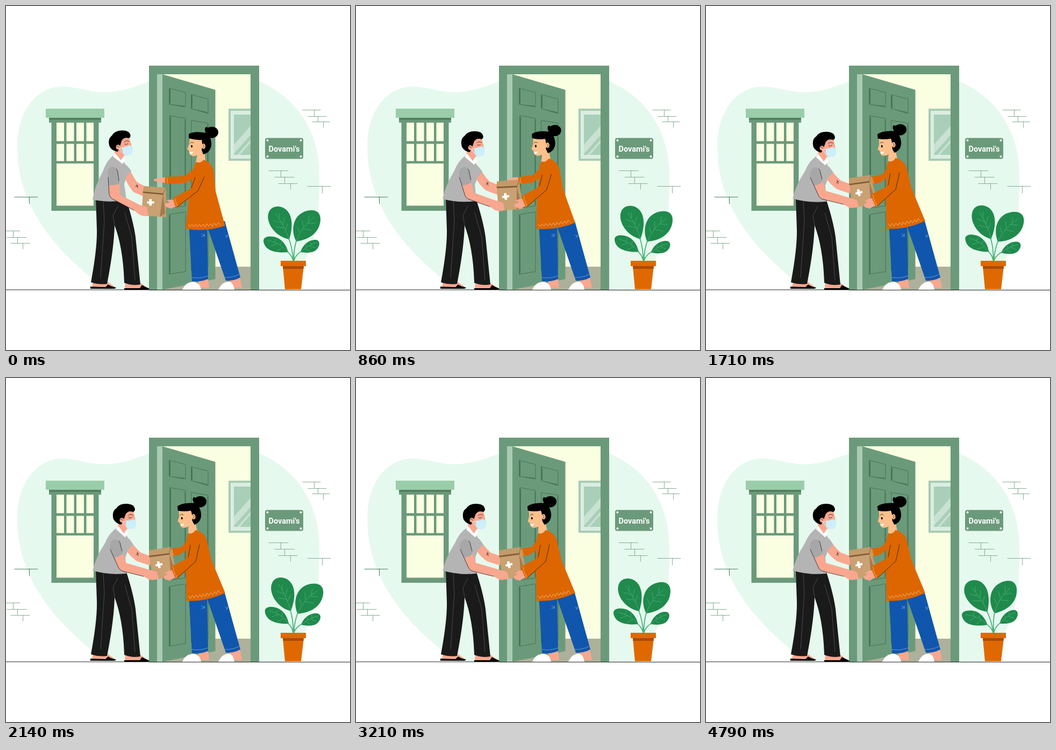
An HTML page that plays this animation: 640x640 px, repeating every 7210 ms.

```html
<!DOCTYPE html>
<html lang="en">
<head>
<meta charset="utf-8">
<title>Doorstep delivery</title>
<style>
html, body { margin: 0; width: 100%; height: 100%; overflow: hidden; background: #fff; }
svg { display: block; width: 100vw; height: 100vh; }
.wood { fill: #6b9a7a; }
.glow { fill: #faffe2; }
.line { fill: none; stroke-linecap: round; stroke-linejoin: round; }
.ink { stroke: #202020; stroke-width: .8; }
.skin { fill: #f9a78f; }
.face { fill: #fdc08c; }
.shirt { fill: #b4b4b4; }
.tunic { fill: #dd6600; }
.stitch { stroke: #f6bd84; stroke-width: .8; }
.leaf { fill: #1f8a4c; }
.vein { stroke: #4bb27c; }
.jeans { fill: #1056ad; }
</style>
</head>
<body>
<svg viewBox="0 0 640 640">
  <!-- wall -->
  <path fill="#e6f9ee" d="M185 528C130 482 21 400 21 262C22 190 60 151 103 150C140 150 155 163 195 160C235 156 255 143 290 132H450C535 160 583 226 583 317C583 385 580 435 552 480L530 510V528Z"/>
  <path class="line" stroke="#4f7f63" d="M16 355.5H59M43.500 355V368"/>
  <path class="line" stroke="#86ad94" d="M0 418.500H26M13.500 418V430M2 430.500H38M21.500 430V441M9 441.500H44M31.500 441V452M552 193.500H585M573.500 193V205M562 205.500H596M580.500 205V215M570 215.500H602M590.500 215V226M489 306.500H525M511.500 306V318M500 318.500H536M518.500 318V330M507 330.500H542M529.500 330V341M561 335.500H604M588.500 335V348"/>

  <!-- window -->
  <path class="wood" d="M80 208H177V217H172.500V381H84.500V217H80Z"/>
  <path fill="#547f61" d="M80 208H177V212H80Z"/>
  <path fill="#9acdaa" d="M74 191H183V208H74Z"/>
  <path class="glow" d="M94 217H108V251.500H94ZM112.500 217H126.500V251.500H112.500ZM131 217H145V251.500H131ZM149.500 217H163V251.500H149.500ZM94 256.500H108V288.500H94ZM112.500 256.500H126.500V288.500H112.500ZM131 256.500H145V288.500H131ZM149.500 256.500H163V288.500H149.500ZM94 293H163V371.500H94Z"/>

  <!-- doorway -->
  <path class="wood" d="M266 111H471V528H266Z"/>
  <path class="glow" d="M281 127H455V528H281Z"/>
  <path fill="#adb09a" d="M380 485H455V528H291Z"/>
  <path fill="#a9cbb4" d="M281 127H291V528H281ZM414 191H455V288H414Z"/>
  <path fill="#d9eee1" d="M418 195H455V284H418Z"/>
  <path fill="#a9cfb8" d="M424 202H455V277H424Z"/>
  <path fill="#c9e2d2" d="M424 258L455 223V240L424 275ZM430 277L455 249V254L435 277Z"/>
  <path class="wood" d="M291 127L389.500 156V508L291 528Z"/>
  <path class="line" stroke="#467354" d="M304 153L334 161V188L304 183ZM345 165L376 173V200L345 191ZM305 204L334 209V372L305 376ZM345 213L376 218V366L345 370ZM304 388L334 383V494L304 499ZM345 381L376 377V486L345 492Z"/>
  <path fill="#467354" d="M304 153L306 156V181L304 183ZM304 183L334 188L331 185.500ZM345 165L347 168V189L345 191ZM345 191L376 200L373 197ZM305 204L307 208V376H305ZM304 388L306 390V497L304 499ZM334 209L332.500 214V370L334 372ZM376 218L374.500 222V366H376Z"/>
  <path fill="none" stroke="#222" d="M0 528H266M266 528.500H640"/>

  <!-- name plate -->
  <rect class="wood" x="482" y="245.500" width="71" height="39" rx="4"/>
  <g fill="#fff"><circle cx="486.500" cy="250" r="2"/><circle cx="548.500" cy="250" r="2"/><circle cx="486.500" cy="280" r="2"/><circle cx="548.500" cy="280" r="2"/></g>
  <text x="517.500" y="270.500" text-anchor="middle" fill="#fff" font-family="Roboto, sans-serif" font-weight="700" font-size="14.500">Dovami's</text>

  <!-- plant -->
  <g id="plant">
    <path class="line vein" stroke-width="1.800" d="M525 430Q533 449 534.500 474M541 434Q535 452 535.500 474M519 454Q531 461 534.500 474M554 454Q539 461 535.500 474"/>
    <path class="leaf" d="M527 434C499 429 484 402 488 387C491 371 511 370 520 378C534 389 534 412 527 434Z"/>
    <path class="leaf" d="M540 438C529 418 533 388 560 381C577 377 585 384 585 397C584 423 562 435 540 438Z"/>
    <path class="leaf" d="M525 458C503 460 481 456 479 437C479 428 493 427 504 431C516 436 522 447 525 458Z"/>
    <path class="leaf" d="M548 458C551 445 564 434 577 435C587 437 583 451 574 456C566 460 556 459 548 458Z"/>
    <path class="line vein" stroke-width=".8" d="M501 386Q518 408 527 434M508 396L508 386M515 407L518 393M520 417L524 405M512 403L498 399M518 413L502 411M573 393Q549 411 540 438M563 401L564 390M553 411L551 399M546 421L542 411M560 404L575 404M551 414L568 417M487 436Q510 440 525 458M500 440L503 433M510 445L513 438M505 442L493 447M515 449L504 455M578 440Q561 445 548 458M568 444L566 439M560 449L558 444M565 446L575 450M557 452L565 456"/>
  </g>
  <path fill="#df6900" d="M511 474H558V484H554L549 527H519L515 484H511Z"/>
  <path fill="#a64c06" d="M515 484H554L553.500 489H515.500Z"/>

  <!-- woman: far arm -->
  <path class="skin" d="M298 319L287 319L276 322Q273 326 279 326L288 328L298 329Z" data-to="M308 319L299 318L288 321Q285 325 291 326L299 329L309 330Z"/>
  <path class="tunic" d="M358 296L333 316L297 318Q294 323 297 331L334 329L354 319Z" data-to="M344 294L327 314L306 318Q305 324 310 332L325 328L341 316Z"/>
  <path class="line stitch" d="M299 320L301 322L299 324L301 326L299 328L301 330" data-to="M308 319L310 321L309 323L311 325L310 328L313 330"/>

  <!-- woman: legs -->
  <path class="skin" d="M357 508H376L378 524.500H359ZM416 508L435 505L439 524.500H419Z"/>
  <path fill="#fff" d="M328 528Q334 513 350 513Q361 515 363 528ZM395 528Q402 512 416 513Q423 515 425 528Z"/>
  <path class="jeans" d="M340 400H374L376 508Q360 514 346 512ZM372 404L407 400L436 505Q424 512 409 511Z"/>
  <path class="line" stroke="#83a9db" stroke-width=".8" d="M346 505Q360 508 376 502M407 505Q421 506 434 499M364 424L369 427L364 429M369 424V429M408 426L412 429L409 431M413 425L411 429"/>

  <!-- woman: body -->
  <g id="woman">
    <path class="face" d="M357 272L353 291Q361 300 371 288L369 268Z"/>
    <path class="face" d="M342 244L341 257L337.500 265Q337 268 340 268L341 274Q343 280 351 279Q361 277 367 270L372 260L365 243Z"/>
    <path d="M340 238Q350 232 372 236Q383 243 382 259Q380 273 367 276L364 268Q366 256 364 249Q352 250 340 246Z"/>
    <ellipse cx="383" cy="235" rx="12" ry="10.500"/><ellipse cx="373" cy="230" rx="3" ry="5"/>
    <ellipse class="face" cx="367.500" cy="261" rx="3.500" ry="5"/>
    <path class="line ink" d="M367 258Q370 260 367 264M343 255Q346 252 349 255"/>
    <ellipse cx="345.500" cy="261" rx="1.500" ry="2.300"/>
    <path fill="#fff" d="M341.500 271Q345 273 348.500 271Q347 276 342.500 275Z"/>
    <path class="tunic" d="M354 290Q361 294 368 286Q383 292 386 306L390 345L407.500 409Q371 421 334 414.500L341 350L348 316Q346 301 354 290Z"/>
    <path class="line stitch" d="M339 406L342 411L346 406L349 411L353 406L356 411L360 406L363 411L367 406L370 411L374 405L377 410L381 405L384 410L388 404L391 409L395 403L399 408"/>
  </g>

  <!-- man: far arm -->
  <path class="skin" d="M219 315L231 306Q239 322 244 328L260 336L258 355L237 346Q226 333 219 315Z" data-to="M223 320L236 309Q244 319 251 325L270 332L268 349L244 341Q232 333 223 320Z"/>
  <path class="line ink" d="M241 336L246 334M243 332L245 338" data-to="M242 329L247 326M244 324L246 331"/>
  <path class="shirt" d="M216 290Q226 296 233 307L220 321L212 314Z" data-to="M220 292Q230 298 237 310L223 323L216 316Z"/>

  <!-- man: legs -->
  <path class="skin" d="M162 512H187L203 523H160ZM222 514H248L265 525H221Z"/>
  <path d="M157 522L185 523L190 518L195 521L205 524Q204 526 198 526H157ZM220 525L249 525L253 519L258 522L267 526Q267 528 260 528H220Z"/>
  <path fill="#1a1a1a" d="M167 355H222Q237 400 241 430L250 518Q235 521 220 515Q218 450 202 408Q201 450 188 517Q172 519 158 514Q170 450 169 415Z"/>
  <path class="line" stroke="#555" stroke-width=".8" d="M181 364L183 400L176 505M202 408L199 390L208 372M221 385L234 430L240 510"/>

  <!-- man: body -->
  <g id="man">
    <path class="skin" d="M203 266L201 282L217 292L220 275Z"/>
    <path class="shirt" d="M201 277Q187 287 180 308Q165 335 161 360Q193 367 224 361L220 331Q229 306 219 289Z"/>
    <path fill="#fff" d="M203 274L199 280L217 294L222 286L219 279L214 287Z"/>
    <path class="skin" d="M207 247L229 245L233 257L234 270L222 278Q211 276 207 266Z"/>
    <path d="M208 271Q198 270 193 262Q188 248 197 241Q202 232 215 231.500Q229 231 231 239Q233 243 229 246Q219 243 215 251L212 261Z"/>
    <ellipse class="skin" cx="208.500" cy="262.500" rx="4" ry="4.500"/>
    <path class="line ink" d="M206 261Q209 259 210 263M221 257Q224 259 227 256M220 253Q224 249 229 252"/>
    <path fill="#cdeefb" d="M216 263Q224 262 230 259L235 263Q237 269 234 275Q228 280 220 277Q216 272 216 263Z"/>
    <path class="line" stroke="#d8eff8" d="M210 266L217 264M211 266L219 275"/>
  </g>

  <!-- parcel -->
  <g id="bag">
    <path fill="#c49c6c" d="M292 348L298 338L298 393L283 392Z"/>
    <path fill="#c9a172" d="M255 345L292 350L286 392L252 390Z"/>
    <path fill="#a17a50" d="M292 350L296 386L286 392Z"/>
    <path fill="#c39a69" d="M257 335L298 338L294 351L254 347Z"/>
    <path fill="none" stroke="#805a35" stroke-width="2.600" d="M255 346.500L293 350"/>
    <path class="line" stroke="#8f6b45" d="M298 338L292 350"/>
    <path fill="#fff" d="M266.500 359H271V363.500H275.500V367.500H271V371.500H266.500V367.500H262.500V363.500H266.500Z"/>
  </g>

  <!-- near arms -->
  <path class="skin" d="M192 331L192 350Q194 358 202 361L238 380L248 388Q260 393 265 389L262 374L249 370L213 352L210 328Z" data-to="M202 333L209 352Q211 358 219 360L256 369L266 375Q277 377 284 373L281 361L268 357L223 344L217 325Z"/>
  <path fill="#a7a7a7" d="M190 319Q187 303 197 299Q206 300 208 309L211 330Q202 335 191 333Z" data-to="M194 319Q191 304 202 300Q212 301 213 310L217 327Q210 333 201 334Z"/>
  <path class="line ink" d="M205 303Q208 306 208 310L210 325M190 319L192 350Q194 358 202 361L238 380" data-to="M210 303Q213 306 213 311L216 322M194 319L209 352Q211 358 219 360L256 369"/>
  <path class="skin" d="M315 361L306 360L298 362L304 365L297 367Q294 370 298 374L307 377L317 373Z" data-to="M312 358L304 358L295 363L301 365L294 369Q293 373 297 375L305 377L316 370Z"/>
  <path class="tunic" d="M353 315L343 340L311 357Q312 367 317 376L357 346L370 317Z" data-to="M344 309L337 335L307 351Q310 364 317 374L354 342L361 308Z"/>
  <path class="line ink" d="M352 319L345 338M369 318L357 344L318 374" data-to="M343 311L339 333M360 310L353 341L319 372"/>
  <path class="line stitch" d="M314 358L316 361L314 363L317 365L316 368L319 370L318 373" data-to="M310 351L312 355L311 358L314 361L313 364L317 367L317 371"/>
</svg>
<script>
const LOOP = 7210, STEP = 71.5, LAST = 67, TURN = 1500, END = LAST * STEP;
const el = id => document.getElementById(id);
const mix = (a, b, k) => a + (b - a) * k;
const ease = x => {
  x = Math.min(1, Math.max(0, x));
  return x * x * (3 - 2 * x);
};
const numbers = d => d.match(/-?[\d.]+/g).map(Number);
const limbs = [...document.querySelectorAll('[data-to]')].map(path => {
  const shape = path.getAttribute('d');
  return { path, shape, from: numbers(shape), to: numbers(path.dataset.to) };
});
const turn = (id, angle, x, y, dx = 0, dy = 0) =>
  el(id).setAttribute('transform', `translate(${dx} ${dy}) rotate(${angle} ${x} ${y})`);

function draw(ms) {
  // motion runs in even steps, then holds until the loop restarts
  const t = Math.min(LAST, Math.floor((ms % LOOP + 5) / STEP)) * STEP;
  const reach = ease(t / TURN);
  const sway = 5 * reach - 10 * ease((t - TURN) / (END - TURN));
  turn('plant', sway, 535, 474);
  turn('man', 4 * reach, 185, 362);
  turn('woman', -7.4 * reach, 335, 414, 1.5 * reach);
  turn('bag', -13 * reach, 269, 365, 15.5 * reach, -18 * reach);
  for (const { path, shape, from, to } of limbs) {
    let i = 0;
    path.setAttribute('d', shape.replace(/-?[\d.]+/g, () => mix(from[i], to[i++], reach).toFixed(2)));
  }
}

const start = performance.now();
function tick() {
  draw(performance.now() - start);
  requestAnimationFrame(tick);
}
tick();
</script>
</body>
</html>
```
